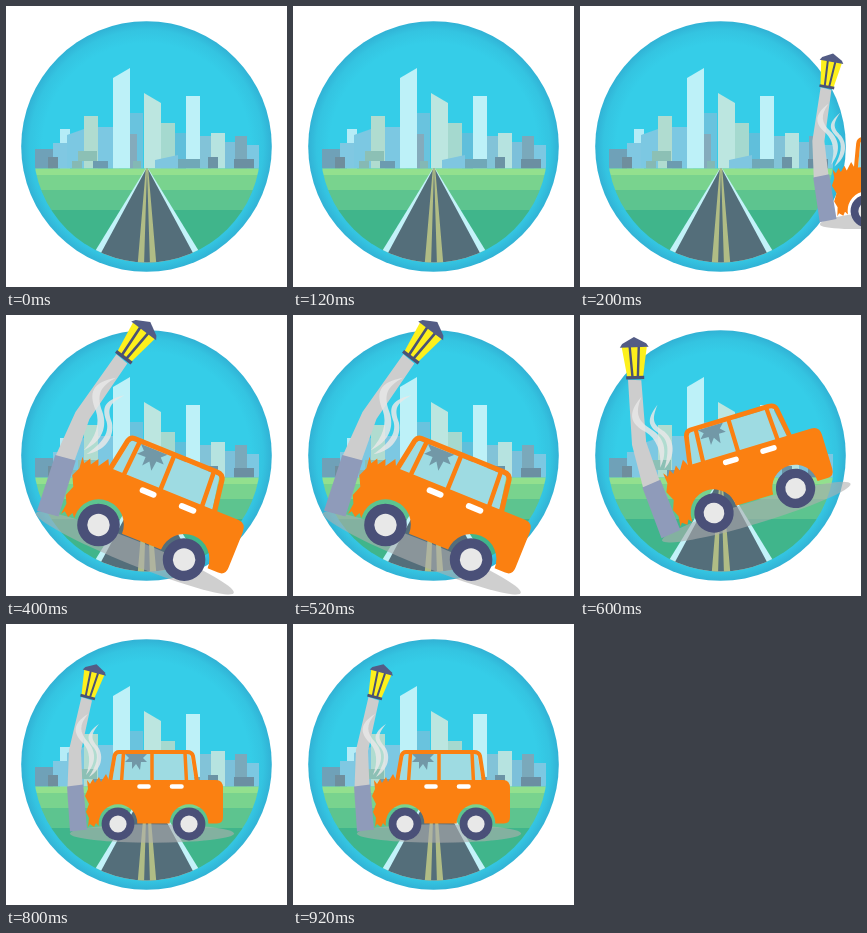
An HTML page with a canvas that plays this animation: 281 px wide and 281 px high, repeating every 1 s.

```html
<!DOCTYPE html>
<html lang="en">
<head>
<meta charset="utf-8">
<title>Car crash</title>
<style>
html, body { margin: 0; width: 100%; height: 100%; overflow: hidden; background: #fff; }
canvas { display: block; width: 281px; height: 281px; }
</style>
</head>
<body>
<canvas id="stage"></canvas>
<script>
const SIZE = 281, STEP = 200;
const canvas = document.getElementById('stage');
const ctx = canvas.getContext('2d');
const dpr = window.devicePixelRatio || 1;
canvas.width = canvas.height = Math.round(SIZE * dpr);

// Front wheel position, scale and tilt in degrees; null is the empty road.
const poses = [
  null,
  { x: 287, y: 205, scale: 1, tilt: -4.5 },
  { x: 92.5, y: 210, scale: 1.3, tilt: 22 },
  { x: 134, y: 198, scale: 1.2, tilt: -16.8 },
  { x: 112, y: 200, scale: 1, tilt: 0 }
];

function fill(color, d) {
  ctx.fillStyle = color;
  ctx.fill(new Path2D(d));
}

function stroke(color, width, d) {
  ctx.strokeStyle = color;
  ctx.lineWidth = width;
  ctx.stroke(new Path2D(d));
}

function rect(color, x, y, right, bottom) {
  ctx.fillStyle = color;
  ctx.fillRect(x, y, right - x, bottom - y);
}

function disc(color, x, y, rx, ry = rx) {
  ctx.fillStyle = color;
  ctx.beginPath();
  ctx.ellipse(x, y, rx, ry, 0, 0, Math.PI * 2);
  ctx.fill();
}

function drawCity() {
  const base = 162.5;
  const block = (color, x, y, right) => rect(color, x, y, right, base);
  block('#6fa1b8', 29, 143, 47);
  block('#b5ecf7', 54, 123, 64);
  block('#80c8e2', 47, 137, 61);
  fill('#7cc8e2', 'M61 129L78 123V162.5H61Z');
  block('#b0dcd0', 78, 110, 92);
  block('#7cc8e2', 92, 121, 113);
  block('#69c3de', 124, 107, 137);
  fill('#bdf1f8', 'M107 72L124 62V162.5H107Z');
  block('#84abbc', 124, 128, 131);
  fill('#bce6e0', 'M138 87L155 97V162.5H138Z');
  block('#a5d9cf', 155, 117, 169);
  block('#60bfdb', 169, 127, 180);
  block('#bdf1f8', 180, 90, 194);
  block('#82c3d8', 194, 130, 205);
  block('#b6e3e0', 205, 127, 219);
  block('#7cc0da', 219, 136, 229);
  block('#7aa9bb', 229, 130, 241);
  block('#7cc8e2', 241, 139, 253);
  block('#6f8e9d', 42, 151, 52);
  block('#86b9b4', 66, 155, 76);
  rect('#8cc0b5', 72, 145, 91, 155);
  block('#6c9bb0', 87, 155, 102);
  block('#83b8b5', 127, 155, 135);
  fill('#7fc6e0', 'M149 154L172 149V162.5H149Z');
  block('#70a8b8', 172, 153, 194);
  block('#6b93a5', 202, 151, 212);
  block('#6b8fa2', 228, 153, 248);
}

function drawScene() {
  const sky = ctx.createRadialGradient(140.5, 141, 104, 140.5, 140.5, 125.3);
  sky.addColorStop(0, '#35cde8');
  sky.addColorStop(.6, '#34c4e1');
  sky.addColorStop(1, '#31b2d5');
  disc(sky, 140.5, 140.5, 125.3);

  ctx.save();
  ctx.beginPath();
  ctx.arc(141, 143, 113.5, 0, Math.PI * 2);
  ctx.clip();
  drawCity();
  rect('#93e08e', 20, 162.5, 262, 169);
  rect('#79d38e', 20, 169, 262, 184);
  rect('#5dc48f', 20, 184, 262, 204);
  rect('#40b58b', 20, 204, 262, 262);
  fill('#c3f2f9', 'M139.8 162.5H142.2L202 260H80Z');
  fill('#546e7a', 'M140.4 162.5H141.6L194 260H88Z');
  fill('#b0bc85', 'M139.8 162.5H141L138 260H131.5ZM141 162.5H142.2L150.5 260H144Z');
  ctx.restore();
}

function drawLamp() {
  ctx.save();
  ctx.translate(81.7, 73.2);
  ctx.rotate(15 * Math.PI / 180);
  fill('#fdf01c', 'M-6.5 0L-10.5 -26H10.5L6.5 0Z');
  stroke('#4a5275', 2, 'M-3.8 -26L-2.2 0M3.8 -26L2.2 0');
  fill('#535c85', 'M-12 -25.5L-10 -28.5L0 -34L10 -28.5L12 -25.5Z');
  rect('#4a5275', -7.5, -1.5, 7.5, 1.2);
  ctx.restore();
}

function drawPost() {
  fill('#cdcdcd', 'M75.5 73L86 76.5L75 127L76.5 163H61.5L63 126Z');
  fill('#8f9bba', 'M61 162.5L77.2 160.5L81 205.5L64 207.5Z');
  drawLamp();
}

function drawSmoke() {
  const color = 'rgba(232,232,232,.85)';
  fill(color, 'M82 90C66 100 67 109 77 119C84 127 85 138 80 151C91 139 90 127 82 118C73 108 73 101 82 90Z');
  fill(color, 'M93 100C79 110 81 116 88 124C94 132 90 142 83 153C96 145 98 132 92 123C85 115 84 111 93 100Z');
}

function drawCar() {
  fill('#9edbe2', 'M106 157L111 130H184L189 157Z');
  fill('#7298a7', 'M119 130H141L137 134L141 138L135 138L134 146L130 140L126 145L126 138L119 138L123 134Z');
  ctx.lineJoin = 'round';
  stroke('#fb8011', 4, 'M104 158L108.5 132Q109.5 128 113 128H181Q186 128 187 132L191 158');
  stroke('#fb8011', 3.5, 'M117.5 129L115.5 158M146 129V158M179 129L180.5 158');
  fill('#fb8011', 'M81 156L84 160L87 155L89 159L93 153L95 158L100 150L103 156H210'
    + 'Q217 156 217 164V193Q217 199.5 211 199.5H202.3A19.3 19.3 0 0 0 163.7 199.5H131.3'
    + 'A19.3 19.3 0 0 0 92.7 199.5V202L90 199L88 203L84 200L82 203L83 194L80 188L83 180L79 172L82 165Z');
  ctx.lineCap = 'round';
  stroke('#fff', 4.6, 'M133.5 162.5H142.5M166 162.5H175.5');
  for (const x of [112, 183]) {
    disc('#4a5078', x, 200, 16.4);
    disc('#e8e8e8', x, 200, 8.6);
  }
}

function drawCrash({ x, y, scale, tilt }) {
  ctx.save();
  ctx.translate(x, y);
  ctx.rotate(tilt * Math.PI / 180);
  ctx.scale(scale, scale);
  ctx.translate(-112, -200);
  disc('rgba(175,175,175,.6)', 146, 209.5, 82, 9.3);
  drawPost();
  drawSmoke();
  drawCar();
  ctx.restore();
}

const start = performance.now();

function render() {
  const time = performance.now() - start;
  const pose = poses[Math.floor(time / STEP) % poses.length];
  ctx.setTransform(dpr, 0, 0, dpr, 0, 0);
  rect('#fff', 0, 0, SIZE, SIZE);
  drawScene();
  if (pose) drawCrash(pose);
  requestAnimationFrame(render);
}

render();
</script>
</body>
</html>
```
